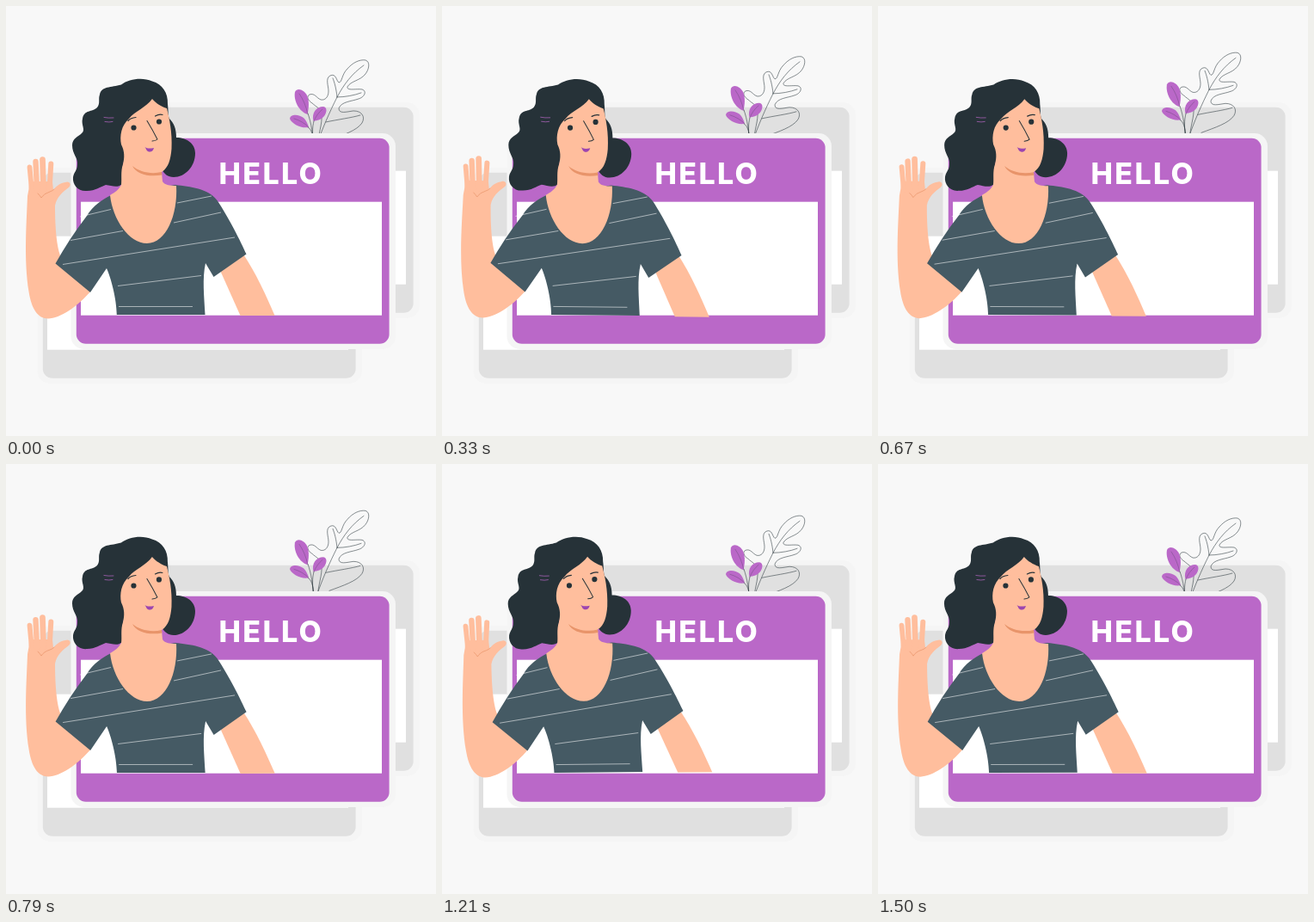
Recreate the animation shown at these times as an HTML page. Size 500 by 500 pixels, loop 1540 ms.

```html
<!DOCTYPE html>
<html lang="en">
<head>
<meta charset="utf-8">
<title>Hello badge</title>
<style>
  html, body { margin: 0; width: 100%; height: 100%; overflow: hidden; background: #f8f8f8; }
  svg { display: block; width: 100%; height: 100%; }
  .purple { fill: #ba68c8; }
  .grey { fill: #e0e0e0; }
  .skin { fill: #ffbe9d; }
  .shirt { fill: #455a64; }
  .dark { fill: #263238; }
  .line { fill: none; stroke: #263238; stroke-width: .55; stroke-linecap: round; stroke-linejoin: round; }
  .finger { fill: none; stroke: #ffbe9d; stroke-linecap: round; }
  .crease { fill: none; stroke: #e8946a; stroke-width: .7; stroke-linecap: round; }
  .stripe { fill: none; stroke: #fff; stroke-width: .55; }
  .clip { fill: none; stroke: #ba68c8; stroke-width: .7; stroke-linecap: round; }
  text { font: 800 34px Inter, "Open Sans", sans-serif; fill: #fff; letter-spacing: 2.3px; }
</style>
</head>
<body>
<svg viewBox="0 0 500 500">
  <defs>
    <g id="card">
      <rect x="75.5" y="148" width="377.5" height="251" rx="15" fill="#f5f5f5"/>
      <rect x="81.8" y="153.7" width="363.8" height="239" rx="11"/>
      <rect x="87" y="227.7" width="350" height="132" fill="#fff"/>
    </g>
  </defs>

  <use href="#card" class="grey" x="28" y="-36"/>
  <use href="#card" class="grey" x="-39" y="40"/>

  <g id="plant">
    <path class="line" d="M362 165 C363 148 368 138 367 126 C366 119 360 117 356 113 C351 110 349 105 353 103
      C359 101 361 107 366 109 C371 110 375 106 375 99 C375 93 371 84 377 81 C384 78 384 87 387 89
      C391 89 390 80 397 73 C403 66 411 62 418 63 C424 65 422 74 418 79 C412 87 401 87 397 94
      C396 99 407 96 414 97 C420 99 417 106 410 108 C402 111 390 111 387 119 C387 126 396 123 404 122
      C414 122 418 129 414 136 C408 145 392 150 376 156"/>
    <path class="line" d="M360 165 C368 142 376 124 385 106 C393 91 402 79 416 69 M385 106 C384 96 382 89 380 84
      M385 106 C394 106 405 104 413 101 M372 135 C386 132 402 130 412 127"/>
    <path class="line" d="M351 125 C355 136 357 150 358 165 M351 141 C355 143 357 149 358 160 M358 134 C356 141 356 151 358 165"/>
    <path class="purple" d="M350.500 126 C341 123 334 110 336 100 C339 94 347 98 350 104 C353 111 352 119 350.500 126Z"/>
    <path class="purple" d="M352 141 C344 143 332 137 330 131 C331 125 341 126 346 130 C350 134 351 138 352 141Z"/>
    <path class="purple" d="M357.500 134 C355 124 361 117 369 117 C374 118 373 124 370 128 C367 132 362 133 357.500 134Z"/>
    <path class="line" stroke-opacity=".45" d="M341 102 Q348 112 351 126 M335 131 Q345 134 352 141 M368 120 Q361 126 358 134"/>
  </g>

  <use href="#card" class="purple"/>
  <text x="247.6" y="207.3">HELLO</text>

  <g id="woman">
    <path class="skin" d="M247 303 L272.500 360 L312.500 360 C303 338 291 311 275 287Z"/>

    <path class="skin" d="M25 221 C24 250 20.500 295 26.500 332 C29.500 352 37 363.500 49 363.500 C63 363 83 350 99 331 L66 296
      C59 286 57 258 57 232 C59 222 66 216 73 211 C77 207 73 203 69 205 C62 206 58 210 55 214 L54 204 L27 204 Q27 213 25 221Z"/>
    <path class="finger" stroke-width="5.8" d="M27.500 187.500 L30 214"/>
    <path class="finger" stroke-width="6.400" d="M34.500 181 L36 213"/>
    <path class="finger" stroke-width="6.700" d="M42.500 178.500 L43.500 213"/>
    <path class="finger" stroke-width="6" d="M52.300 183.500 L50.500 214"/>
    <path class="crease" d="M37 218 Q40 221 41 223 Q44 218 51 216 Q54 215 56 213"/>

    <path class="shirt" d="M122 220 C112 225 101 232 94 244 C80 262 68 281 57.500 299.500 L98 333 L117 305
      C122 316 128.500 340 128.800 359 L231.500 359 C230.500 338 228 317 232 299 L241.500 315 L279.500 288.500
      C273 274 259 246 245.500 226 C235 212 214 210 197 208Z"/>
    <path class="stripe" d="M86 245 L122 236.500 M75 272.500 L136 261.500 M199 229 L239 221
      M195 252 L250 240 M66 300.500 L266 269 M130 325.500 L227 313.500 M131 349.500 H217"/>

    <path class="dark" d="M109 103 C111 93 122 95 134 91.500 C143 85 158 82.500 170 87.500 C182 91 188.500 101 188 114
      C189 122 188 127 190 131 C195 136 198 142 198 153 C210 153 220 160 220 171 C220 187 208 199 195 199
      C188 199 184 195 181 190 L138 178 C134 188 136 198 135 207 C130 212 123 209 116 208
      C110 210 104 215 94 215 C84 216 77 208 78 199 C79 193 83 191 83 184 C84 177 77 172 77 162
      C77 154 84 152 88 148 C93 144 87 138 89 131 C91 120 100 124 106 118 C110 113 107 108 109 103Z"/>
    <path class="skin" d="M170 108 C163 118 150 122 143 131 C134 139 132 151 134 161 C138 169 138 176 136 184
      C133 193 135 201 134 208 C131 214 126 217 121 220 C124 248 143 276 164 276 C186 276 200 243 198 209
      C190 209 184 208 182 204 L181 193 C189 188 191.500 178 192.500 166 C193.500 147 190 131 187 119 C181 117 174 113 170 108Z"/>
    <path d="M147 186 C155 193 169 196 181 193 L181.500 196.500 C166 199 152 196 147 186Z" fill="#e8946a"/>

    <circle class="dark" cx="148.500" cy="141.500" r="3.100"/>
    <circle class="dark" cx="178" cy="134.500" r="3.100"/>
    <path class="line" style="stroke-width:1.2" d="M142 133.500 Q145 130 151 129.500 M173.500 128 Q178 125.500 182 126.500"/>
    <path class="line" style="stroke-width:1" d="M164 133.500 Q171 145 176 155 Q174 157 170 157"/>
    <path d="M160.500 163 C163 166 167 166 172 165 C171 169 168 170.500 165 169 C163 168 163 165 160.500 163Z" fill="#9c45b0"/>
    <path class="clip" d="M114 129.500 Q119 130.500 125 130 M115 134.500 Q120 135.500 124 134.500"/>
  </g>
</svg>
<script>
  const LOOP = 1540;
  const LEAD = 40;
  const woman = document.getElementById("woman");
  const plant = document.getElementById("plant");
  const angle = ms => ms % LOOP / LOOP * Math.PI * 2;

  function draw(ms) {
    const tilt = 0.6 * Math.sin(angle(ms));
    const lift = -4.4 * (1 - Math.cos(angle(ms + LEAD)));
    woman.setAttribute("transform", `rotate(${tilt} 138 193)`);
    plant.setAttribute("transform", `translate(0 ${lift})`);
  }

  function tick() {
    draw(performance.now());
    requestAnimationFrame(tick);
  }
  tick();
</script>
</body>
</html>
```
